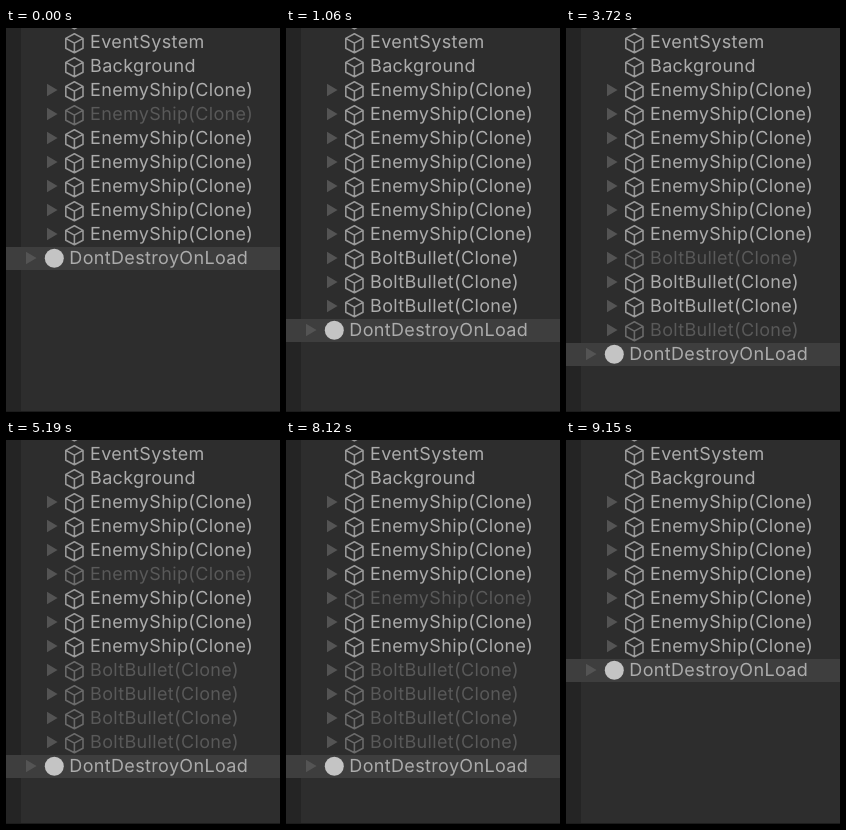
An HTML page for the animation above (9740 ms loop, 274 px wide and 384 px high).

```html
<!DOCTYPE html>
<html lang="en">
<head>
<meta charset="utf-8">
<title>Object pool hierarchy</title>
<style>
  html, body { margin: 0; width: 100%; height: 100%; overflow: hidden; background: #2d2d2d; }
  svg { display: block; width: 274px; height: 384px; }
  text {
    font: 18px Inter, Roboto, sans-serif; letter-spacing: .35px;
    stroke: none; white-space: pre; text-rendering: geometricPrecision;
  }
  .row { fill: #acacac; stroke: #999; }
  .cube { fill: none; stroke-width: 1.6; stroke-linejoin: round; }
  .arrow { fill: #545454; stroke: none; }
</style>
</head>
<body>
<svg id="stage" viewBox="0 0 274 384">
  <defs>
    <path id="cube" class="cube" d="M68.4 -8.2L77 -3.6V6.2L68.4 10.8L59.8 6.2V-3.6ZM59.8 -3.6L68.4 1.1L77 -3.6M68.4 1.1V10.8"/>
    <path id="arrow" class="arrow" d="M41 -6.3L51.6 0L41 6.3Z"/>
  </defs>
  <rect width="274" height="384" fill="#2d2d2d"/>
  <rect width="15" height="384" fill="#242424"/>
  <rect y="383" width="274" height="1" fill="#1c1c1c"/>
  <g id="rows"></g>
  <g id="scene">
    <rect y="219" width="274" height="23" fill="#3e3e3e"/>
    <use href="#arrow" x="-21" y="230"/>
    <circle cx="48.3" cy="230.3" r="9.5" fill="#c4c4c4"/>
    <text x="63.3" y="236.3" fill="#acacac">DontDestroyOnLoad</text>
  </g>
</svg>
<script>
const LOOP = 9740, ROW = 24;
const styles = document.createElement('style');
document.head.append(styles);

const looks = {
  on: 'visibility:visible;fill:#acacac;stroke:#999',
  off: 'visibility:visible;fill:#595959;stroke:#6a6a6a',
  gone: 'visibility:hidden'
};

// Each step is [time in ms, declarations], held until the next one.
function animate(node, id, steps) {
  const frames = steps.map(([time, css]) => `${time / LOOP * 100}%{${css}}`);
  frames.push(`100%{${steps.at(-1)[1]}}`);
  styles.append(`@keyframes ${id}{${frames.join('')}}`);
  node.style.animation = `${id} ${LOOP}ms step-end infinite`;
}

let count = 0;
function addRow(label, hasArrow, first, ...changes) {
  const row = document.createElementNS('http://www.w3.org/2000/svg', 'g');
  row.setAttribute('class', 'row');
  row.setAttribute('transform', `translate(0 ${ROW * count++ - 10})`);
  row.innerHTML = `${hasArrow ? '<use href="#arrow"/>' : ''}<use href="#cube"/><text x="84" y="6.3">${label}</text>`;
  document.getElementById('rows').append(row);
  if (first) {
    const steps = [[0, first], ...changes].map(([time, look]) => [time, looks[look]]);
    animate(row, `row${count}`, steps);
  }
}

const ship = (...states) => addRow('EnemyShip(Clone)', true, ...states);

// Times alternate between switching on and off; the row leaves at the end.
function bullet(times, removed) {
  const changes = times.map((time, i) => [time, i % 2 ? 'off' : 'on']);
  addRow('BoltBullet(Clone)', true, 'gone', ...changes, [removed, 'gone']);
}

addRow('', false);
addRow('EventSystem', false);
addRow('Background', false);
ship();
ship('off', [340, 'on']);
ship('on', [2260, 'off'], [3270, 'on']);
ship('on', [5190, 'off'], [6060, 'on']);
ship('on', [8120, 'off'], [9000, 'on']);
ship();
ship();
bullet([480, 1370, 1670, 2550, 2830, 3720], 9150);
bullet([780, 1670, 1960, 2830, 3140, 4010], 8860);
bullet([1060, 1960, 2260, 3140, 3420, 4300], 8570);
bullet([1370, 2260, 2550, 3420], 8270);

const shifts = [[0, 0], [480, 1], [780, 2], [1060, 3], [1370, 4], [8270, 3], [8570, 2], [8860, 1], [9150, 0]];
animate(document.getElementById('scene'), 'scene-shift',
  shifts.map(([time, rows]) => [time, `transform:translateY(${rows * ROW}px)`]));
</script>
</body>
</html>
```
